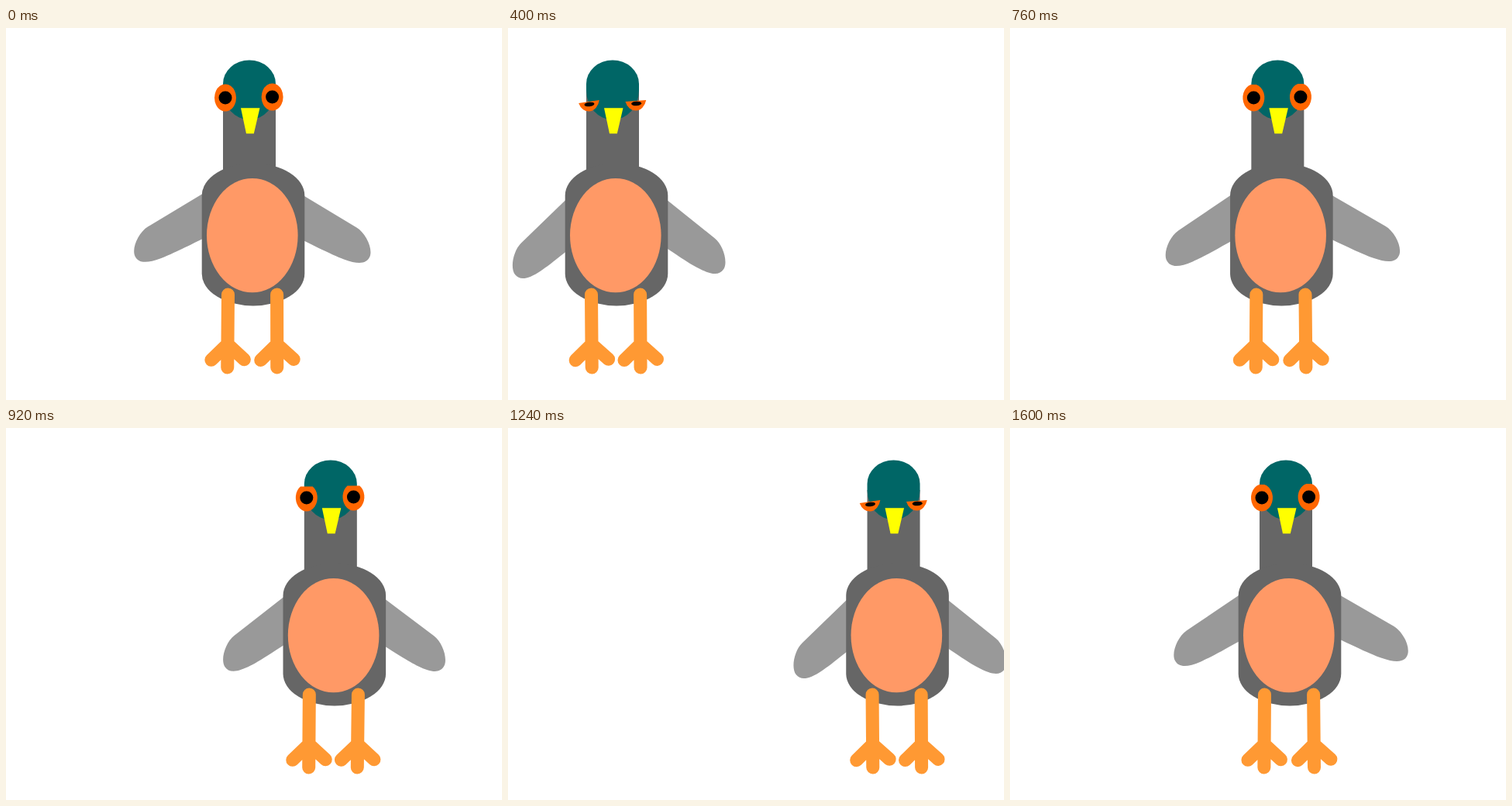
Recreate the animation shown at these times as an HTML page. Size 640 by 480 pixels, loop 1640 ms.

```html
<!DOCTYPE html>
<html lang="en">
<head>
<meta charset="utf-8">
<title>Pigeon</title>
<style>
html, body { margin: 0; width: 100%; height: 100%; overflow: hidden; background: #fff; }
svg { display: block; width: 100vw; height: 100vh; }
</style>
</head>
<body>
<svg viewBox="0 0 640 480">
  <defs>
    <path id="wing" fill="#999" d="M0-12H-108C-122-12-141 1-142 12C-143 22-134 28-115 31.5C-100 34.5-60 37.5-29 39.5L0 41Z"/>
    <path id="leg" fill="none" stroke="#f93" stroke-width="17" stroke-linecap="round" stroke-linejoin="round" d="M0 0V94M-21 84.5L0 64L21.5 83.5"/>
  </defs>
  <g id="bird">
    <use id="wingL" href="#wing"/>
    <g id="wingR"><use href="#wing" transform="scale(-1 1) translate(-4 -5.5)"/></g>
    <rect x="280" y="80" width="68" height="120" fill="#666"/>
    <rect x="252.7" y="174.6" width="132.6" height="183.9" rx="66.3" ry="41.5" fill="#666"/>
    <ellipse cx="317.8" cy="267.6" rx="58.8" ry="73.7" fill="#f96"/>
    <use id="legL" href="#leg"/>
    <use id="legR" href="#leg"/>
    <path fill="#066" d="M280 72A34 30.5 0 0 1 348 72V80A34 38.5 0 0 1 280 80Z"/>
    <g id="eyeL"><path fill="#f60"/><ellipse/></g>
    <g id="eyeR"><path fill="#f60"/><ellipse/></g>
    <path fill="#ff0" d="M303 103.3H327.5L319.8 136.3H310Z"/>
  </g>
</svg>
<script>
const STEP = 40, FRAMES = 41, CYCLE = 21;
const EYE_W = 14, EYE_H = 17.5;
const $ = id => document.getElementById(id);
const mix = (a, b, k) => a + (b - a) * k;

// Key points as [frame, value], joined by straight lines
const TRAVEL = [[0, 0], [8, -227], [18, 13], [29, 215], [40, 42]];
const FLAP_L = [[0, 31], [2, 38], [8, 70], [14, -8], [19, 34], [21, 31]];
const FLAP_R = [[0, 31], [2, 37], [7.5, 68], [14, -8], [19, 30], [21, 31]];
const LID = [[0, -EYE_H], [6, -8.5], [10, 5], [15, 5], [19, -17], [21, -EYE_H]];
const LIFT = [[0, 0], [10, 0], [15, -7], [19, 0], [21, 0]];

function at(keys, t) {
  const i = Math.max(1, keys.findIndex(k => k[0] >= t));
  const [t0, a] = keys[i - 1], [t1, b] = keys[i];
  return mix(a, b, (t - t0) / (t1 - t0));
}

const wave = (p, turns, peak) => Math.cos(2 * Math.PI * turns * (p - peak) / CYCLE);

function place(id, x, y, turn = 0) {
  $(id).setAttribute("transform", `translate(${x} ${y}) rotate(${turn})`);
}

// An oval cut along its top by a sloping lid
function eyePath(left, right) {
  const edge = y => EYE_W * Math.sqrt(Math.max(0, 1 - (y / EYE_H) ** 2)) + 0.01;
  const large = left + right < 0 ? 1 : 0;
  return `M${-edge(left)} ${left}A${EYE_W} ${EYE_H} 0 ${large} 0 ${edge(right)} ${right}Z`;
}

function drawEye(id, x, y, slope, p) {
  const [white, pupil] = $(id).children;
  const lid = at(LID, p), shut = Math.max(0, (lid + 11) / 16);
  place(id, x, y + at(LIFT, p));
  white.setAttribute("d", eyePath(lid + slope * shut, lid - slope * shut));
  pupil.setAttribute("rx", mix(8.5, 6.5, shut));
  pupil.setAttribute("ry", mix(8.5, 2.8, shut));
  pupil.setAttribute("transform", `translate(${shut} ${8.5 * shut}) rotate(${-3 * slope * shut})`);
}

function draw(frame) {
  const p = frame % CYCLE;
  place("bird", at(TRAVEL, frame), 0);
  place("wingL", 282, 211, -at(FLAP_L, p));
  place("wingR", 347.4, 214.8, at(FLAP_R, p));
  place("legL", 286.5, 344, 0.45 * wave(p, 1, 0));
  place("legR", 349.6, 344, 0.15 + 0.7 * wave(p, 2, 3.2));
  drawEye("eyeL", 283, 90, 2, p);
  drawEye("eyeR", 343.6, 89, 1, p);
}

const start = performance.now();
function tick() {
  draw(Math.floor((performance.now() - start) / STEP) % FRAMES);
  requestAnimationFrame(tick);
}
draw(0);
requestAnimationFrame(tick);
</script>
</body>
</html>
```
